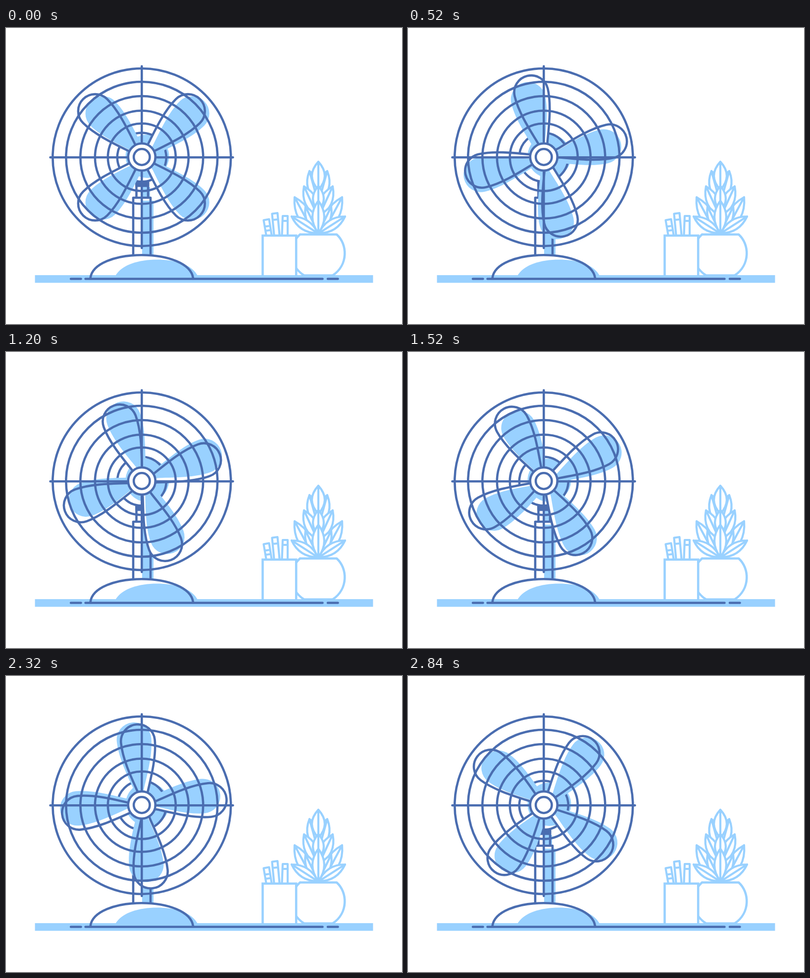
Animation, 800 px wide and 600 px high, one loop 2880 ms. Source, as an HTML page:

```html
<!DOCTYPE html>
<html lang="en">
<head>
<meta charset="utf-8">
<title>Desk fan</title>
<style>
  html, body { margin: 0; width: 100%; height: 100%; overflow: hidden; background: #fff; }
  svg { display: block; width: 100%; height: 100%; }
  .dark { fill: none; stroke: #4a6db0; stroke-width: 4.6; stroke-linecap: round; stroke-linejoin: round; }
  .pale { fill: #fff; stroke: #99d1ff; stroke-width: 4.6; stroke-linecap: round; stroke-linejoin: round; }
  .tint { fill: #99d1ff; }
  .white { fill: #fff; }
</style>
</head>
<body>
<svg viewBox="0 0 800 600">
  <defs>
    <path id="blade" d="M-7 -18 L-9.5 -28 C-21 -62 -34.3 -100 -34.3 -132.5 A34.3 34.3 0 0 1 34.3 -132.5 C34.3 -100 21 -62 9.5 -28 L7 -18"/>
    <path id="tintBlade" d="M-7 -14 L-10 -26 C-21 -58 -35 -96 -35 -127.5 A35 35 0 0 1 35 -127.5 C35 -96 21 -58 10 -26 L7 -14 Z"/>
  </defs>

  <!-- table -->
  <rect class="tint" x="58.5" y="501" width="683" height="15.5"/>

  <!-- plant, pot, pencil cup -->
  <path class="pale" d="M594 418.5 H668 C690 438 692 480 660 501.500 H602 C569 480 571 438 594 418.500"/>
  <rect class="tint" x="588" y="501" width="86" height="6"/>
  <g id="plant" class="pale" style="stroke-width:4.2"></g>
  <g class="pale" style="stroke-width:4.2">
    <path d="M525.500 419 L520.500 389.500 L531.500 387.500 L536.500 419 M523 402.500 L530 401.500 M525 411 L532 410"/>
    <path d="M541.500 419 L537.500 376.500 L548.500 375 L552.500 419 M539 389 L549 388"/>
    <path d="M557.500 419 L559 381 H569 V419 M559 391 H568"/>
  </g>
  <path class="pale" style="stroke-linejoin:miter" d="M518.500 501 V420.700 H586.200 V501"/>

  <!-- stand -->
  <path class="tint" d="M275 350 H298 V460 H275 Z M274 322 H291 V344 H274 Z"/>
  <path class="white" d="M171 501 C178 475 222 460 274 460 C326 460 371 475 377 501 Z"/>
  <path class="tint" d="M220 504 C232 480 268 469.500 305 469.500 C340 469.500 376 478 388 504 Z"/>
  <g class="dark">
    <path d="M170.500 507 C174 477 222 460.300 274 460.300 C326 460.300 374 477 378 507"/>
    <path d="M160.500 508.500 H639.500 M131 508.500 H151.500 M650 508.500 H670.500"/>
    <path d="M257 459 V344 H292 V459 M263.500 344 V312 H287 V344"/>
    <path fill="#4a6db0" d="M263.500 312 H287 V320 H263.500 Z"/>
  </g>

  <!-- motor housing -->
  <circle class="tint" cx="285.500" cy="260" r="44"/>
  <circle class="dark" cx="274.300" cy="262" r="49.500"/>

  <g id="rotor"></g>

  <!-- guard and hub -->
  <g id="guard" class="dark">
    <path d="M89.500 262.300 H458.500 M274.300 77.500 V446"/>
  </g>
  <circle class="dark" style="fill:#fff" cx="274.300" cy="261.500" r="27.500"/>
  <circle class="dark" cx="274.300" cy="261.500" r="16.200"/>
</svg>
<script>
  const $ = id => document.getElementById(id);
  const FRAME = 40, LOOP = 2880;
  const SPIN = 720 / 2833.33; // degrees per ms
  const PIVOT = '277 262.2';

  // pointed leaf with a midrib, h = half width
  function leaf(x, y, bx, by, h) {
    const len = Math.hypot(bx - x, by - y);
    const nx = (by - y) / len * h * 2, ny = (x - bx) / len * h * 2;
    const mx = (x + bx) / 2, my = (y + by) / 2;
    return `<path d="M${x} ${y} Q${mx + nx} ${my + ny} ${bx} ${by} Q${mx - nx} ${my - ny} ${x} ${y} Z L${bx} ${by}"/>`;
  }
  const pair = (x, y, bx, by, h) => leaf(x, y, bx, by, h) + leaf(1262 - x, y, 1262 - bx, by, h);

  $('plant').innerHTML =
    pair(613, 290, 630, 352, 12) +
    leaf(631, 271, 631, 328, 13) +
    pair(602, 321, 630, 382, 12) +
    leaf(631, 320, 631, 372, 11) +
    pair(583, 343, 621, 414, 13) +
    pair(605, 362, 631, 416, 10) +
    pair(577, 382, 630, 416, 10) +
    leaf(631, 350, 631, 416, 12);

  const blades = (ref, cls, x, y) => `<g class="${cls}" transform="translate(${x} ${y})">` +
    [45, 135, 225, 315].map(a => `<use href="#${ref}" transform="rotate(${a})"/>`).join('') + '</g>';

  $('rotor').innerHTML =
    blades('blade', 'white', 273.8, 262.1) +
    blades('tintBlade', 'tint', 285.6, 263.3) +
    blades('blade', 'dark', 273.8, 262.1);

  $('guard').innerHTML += [180, 153, 124, 94.5, 68.5]
    .map(r => `<circle cx="274.3" cy="262" r="${r}"/>`).join('');

  function draw(ms) {
    const t = Math.floor(ms % LOOP / FRAME) * FRAME;
    const angle = Math.max(0, t - FRAME) * SPIN; // rests one step at the start
    $('rotor').setAttribute('transform', `rotate(${angle} ${PIVOT})`);
  }

  const start = performance.now();
  function tick() {
    draw(performance.now() - start);
    requestAnimationFrame(tick);
  }
  tick();
</script>
</body>
</html>
```
